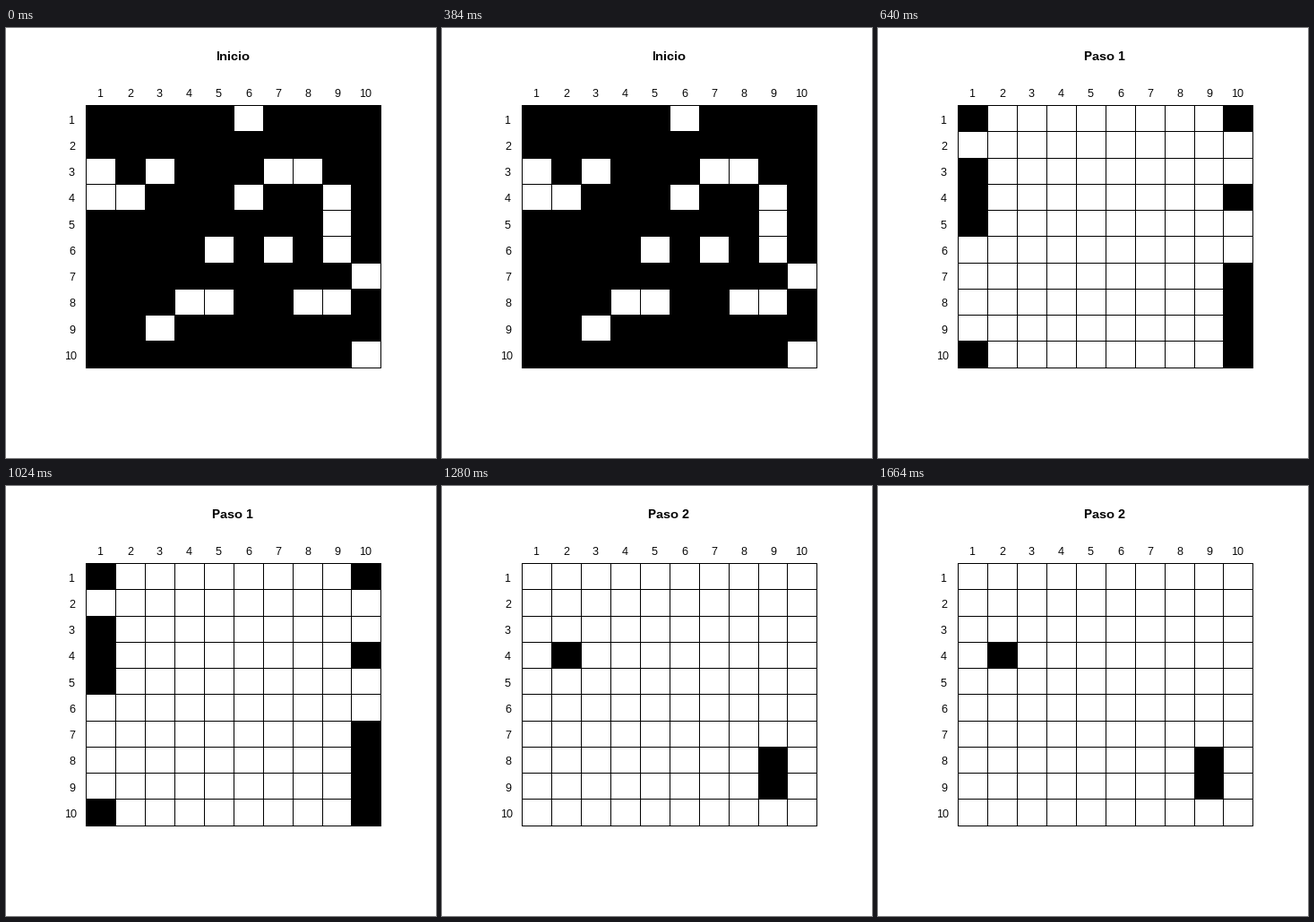
These frames come from a looping animation (480 by 480 pixels, 1920 ms). A matplotlib script:

```python
import numpy as np
import matplotlib.pyplot as plt
from matplotlib.animation import FuncAnimation
from matplotlib.patches import Rectangle

plt.rcParams.update({
    "font.family": "Liberation Sans",
    "text.hinting": "native",
    "text.hinting_factor": 1,
})

SIZE, DPI, N = 480, 96, 10
PT = 72 / DPI  # points per pixel
DIGIT = 7      # advance of one label digit in pixels

# Centre of the label cell, then the size of one cell
X0, CELL_W = 73.51, 32.889
Y0, CELL_H = 71.91, 29.253

EMPTY = {1: [6], 3: [1, 3, 7, 8], 4: [1, 2, 6, 9], 5: [9], 6: [5, 7, 9],
         7: [10], 8: [4, 5, 8, 9], 9: [3], 10: [10]}


def first_grid():
    grid = np.ones((N, N), int)
    for row, cols in EMPTY.items():
        for col in cols:
            grid[row - 1, col - 1] = 0
    return grid


def step(grid):
    """A cell lives when exactly three of its neighbours do."""
    p = np.pad(grid, 1)
    around = sum(p[r:r + N, c:c + N] for r in range(3) for c in range(3)) - grid
    return (around == 3).astype(int)


grids = [first_grid()]
for _ in range(2):
    grids.append(step(grids[-1]))
titles = ["Inicio", "Paso 1", "Paso 2"]

fig = plt.figure(figsize=(SIZE / DPI, SIZE / DPI), dpi=DPI, facecolor="white")
ax = fig.add_axes([0, 0, 1, 1])
ax.set_xlim(0, SIZE)
ax.set_ylim(SIZE, 0)
ax.axis("off")

edges = np.arange(N + 1) + 0.5
xs = np.floor(X0 + CELL_W * edges)
ys = np.floor(Y0 + CELL_H * edges)

cells = ax.pcolormesh(xs, ys, grids[0], cmap="binary", vmin=0, vmax=1,
                      antialiased=False, linewidth=0)


def bar(x, y, w, h):
    ax.add_patch(Rectangle((x, y), w, h, fc="black", lw=0,
                           antialiased=False, zorder=3))


for x in xs:
    bar(x, ys[0], 1, ys[-1] - ys[0] + 1)
for y in ys:
    bar(xs[0], y, xs[-1] - xs[0] + 1, 1)


def label(cx, cy, text):
    left = np.floor(cx - DIGIT * len(text) / 2)
    ax.text(left, np.floor(cy) + 6, text, size=12 * PT,
            ha="left", va="baseline")


for i in range(1, N + 1):
    label(X0 + CELL_W * i, Y0, str(i))
    label(X0, Y0 + CELL_H * i, str(i))

title = ax.text(253.4, 36, "", size=14 * PT, weight="bold",
                ha="center", va="baseline")


def draw(i):
    cells.set_array(grids[i])
    title.set_text(titles[i])
    return cells, title


anim = FuncAnimation(fig, draw, frames=len(grids), interval=640,
                     repeat=True, repeat_delay=0)
plt.show()
```
